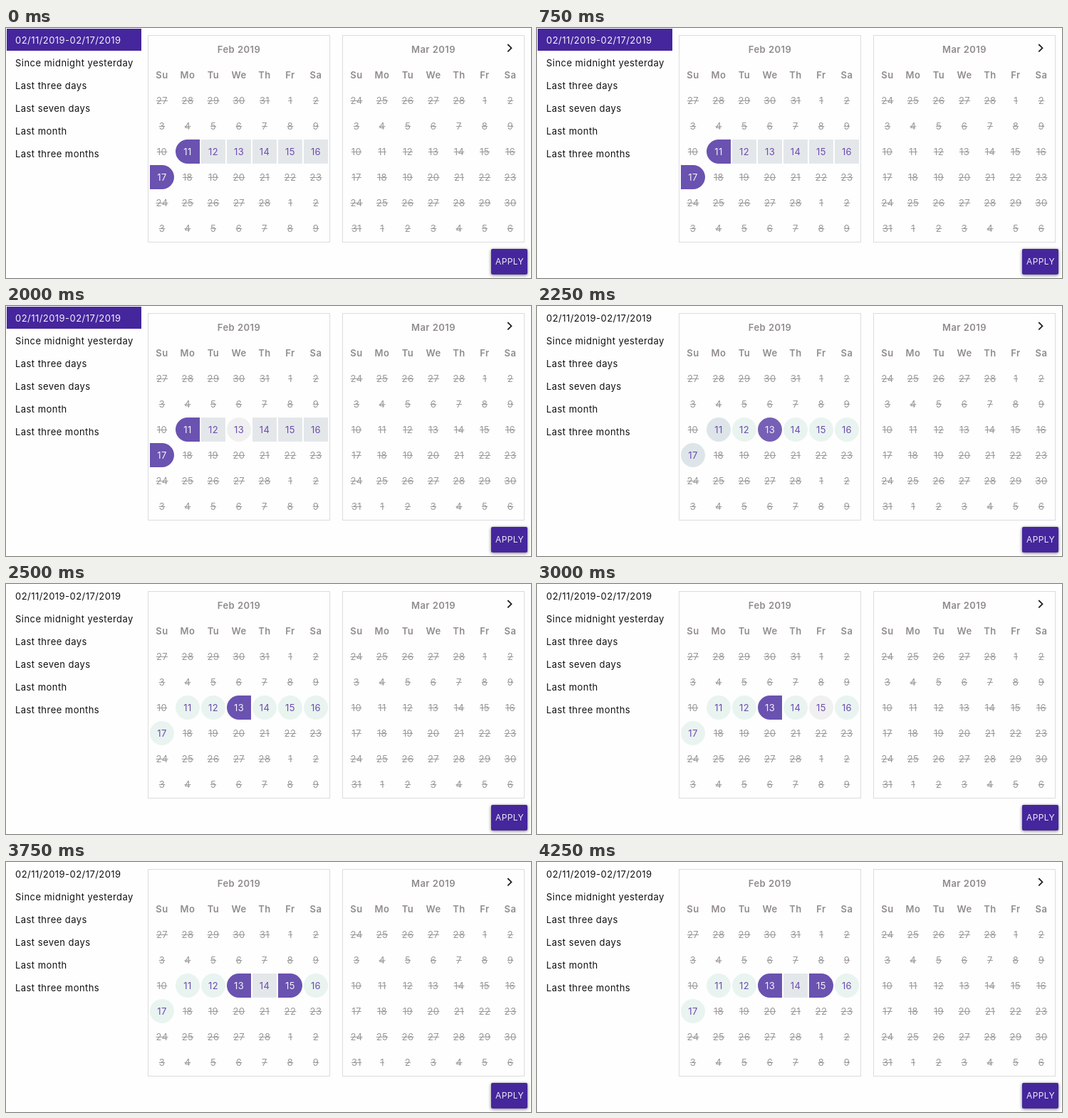
These frames come from a looping animation (737 px wide and 352 px high, 5500 ms). An HTML page:

```html
<!DOCTYPE html>
<html lang="en">
<head>
<meta charset="utf-8">
<title>Date range picker</title>
<style>
  html, body { margin: 0; width: 100%; height: 100%; overflow: hidden; background: #fefefe; }
  body { position: relative; font: 13px Inter, sans-serif; letter-spacing: .45px; }
  div { position: absolute; box-sizing: border-box; white-space: nowrap; }
  .preset { left: 1px; width: 189px; height: 31px; padding-left: 12px; line-height: 32px; color: #111; }
  .preset.active { background: #45269c; color: #f4f1fa; }
  .panel { top: 10px; width: 256px; height: 292px; border: 1px solid #dcdcdc; background: #fefefe; }
  .cell { width: 34px; height: 34px; line-height: 34px; text-align: center; }
  .title { left: 0; top: 2px; width: 254px; line-height: 34px; text-align: center; font-weight: 600; color: #918b8e; }
  .weekday { font-weight: 600; color: #918b8e; }
  .disabled { color: #999; text-decoration: line-through; }
  .apply { left: 681px; top: 311px; width: 51px; height: 36px; padding-left: 1px; border-radius: 2px;
    background: #45269c; color: #eeeaf6; font-size: 12px; letter-spacing: .35px; line-height: 36px;
    text-align: center; box-shadow: 0 1px 4px rgba(0,0,0,.55); }
  svg { position: absolute; left: 695px; top: 16px; }
</style>
</head>
<body>
<script>
const LOOP = 5500;

function add(className, text = "", parent = document.body, left, top) {
  const el = document.createElement("div");
  el.className = className;
  el.textContent = text;
  if (left !== undefined) el.style.left = left + "px";
  if (top !== undefined) el.style.top = top + "px";
  return parent.appendChild(el);
}

const presets = ["02/11/2019-02/17/2019", "Since midnight yesterday", "Last three days",
  "Last seven days", "Last month", "Last three months"]
  .map((label, i) => add("preset", label, document.body, undefined, 1 + 32 * i));

// Returns the day cells by their index in the six-week grid.
function addMonth(title, left, firstSunday, isEnabled) {
  const panel = add("panel", "", document.body, left);
  add("title", title, panel);
  ["Su", "Mo", "Tu", "We", "Th", "Fr", "Sa"].forEach((name, i) =>
    add("cell weekday", name, panel, 2 + 36 * i, 38));
  return Array.from({ length: 42 }, (_, i) => {
    const date = new Date(2019, firstSunday[0], firstSunday[1] + i);
    return add(isEnabled(i) ? "cell" : "cell disabled", date.getDate(), panel,
      2 + 36 * (i % 7), 74 + 36 * Math.floor(i / 7));
  });
}

const FEB_OFFSET = 4;
const february = addMonth("Feb 2019", 199, [0, 27], i => i >= 15 && i <= 21);
addMonth("Mar 2019", 472, [1, 24], () => false);
add("apply", "APPLY");
document.body.insertAdjacentHTML("beforeend",
  '<svg width="24" height="24"><path d="M9.3 7l5.2 5.2-5.2 5.2" fill="none" stroke="#222" stroke-width="1.8"/></svg>');

// Cell looks: fill, text colour, left radius, right radius
const INK = "#6a4cad", WHITE = "#f5f2fa", SOLID = "#6a52b0";
const look = {
  none: ["transparent", "", 17, 17],
  faint: ["#fafafa", "", 17, 17],
  hover: ["#f0f0f0", INK, 17, 17],
  start: [SOLID, WHITE, 17, 0],
  end: [SOLID, WHITE, 0, 17],
  range: ["#e4e7ea", INK, 0, 0],
  open: ["#e9f4f0", INK, 17, 17],
  leaving: ["#dde5e9", INK, 17, 17],
  pressed: ["#7660b5", WHITE, 17, 17],
  rounding: ["#e5ebeb", INK, 8, 8],
  emerging: ["#9788c6", "#cbc4cf", 17, 17],
};

// Each step changes only the named days of February.
const steps = [
  [0, { 11: "start", 12: "range", 13: "range", 14: "range", 15: "range", 16: "range", 17: "end", 21: "none" }],
  [1250, { 21: "faint" }],
  [1500, { 21: "none" }],
  [1750, { 13: "hover" }],
  [2250, { 11: "leaving", 12: "open", 13: "pressed", 14: "open", 15: "open", 16: "open", 17: "leaving" }],
  [2500, { 11: "open", 13: "start", 17: "open" }],
  [3000, { 15: "hover" }],
  [3500, { 14: "rounding", 15: "emerging" }],
  [3750, { 14: "range", 15: "end" }],
];

function render(time) {
  const days = {};
  for (const [start, changes] of steps) if (time >= start) Object.assign(days, changes);
  for (const [day, name] of Object.entries(days)) {
    const [fill, color, left, right] = look[name];
    const style = february[+day + FEB_OFFSET].style;
    style.background = fill;
    style.color = color;
    style.borderRadius = `${left}px ${right}px ${right}px ${left}px`;
  }
  presets[0].classList.toggle("active", time < 2250);
}

function tick() {
  render(performance.now() % LOOP);
  requestAnimationFrame(tick);
}
tick();
</script>
</body>
</html>
```
